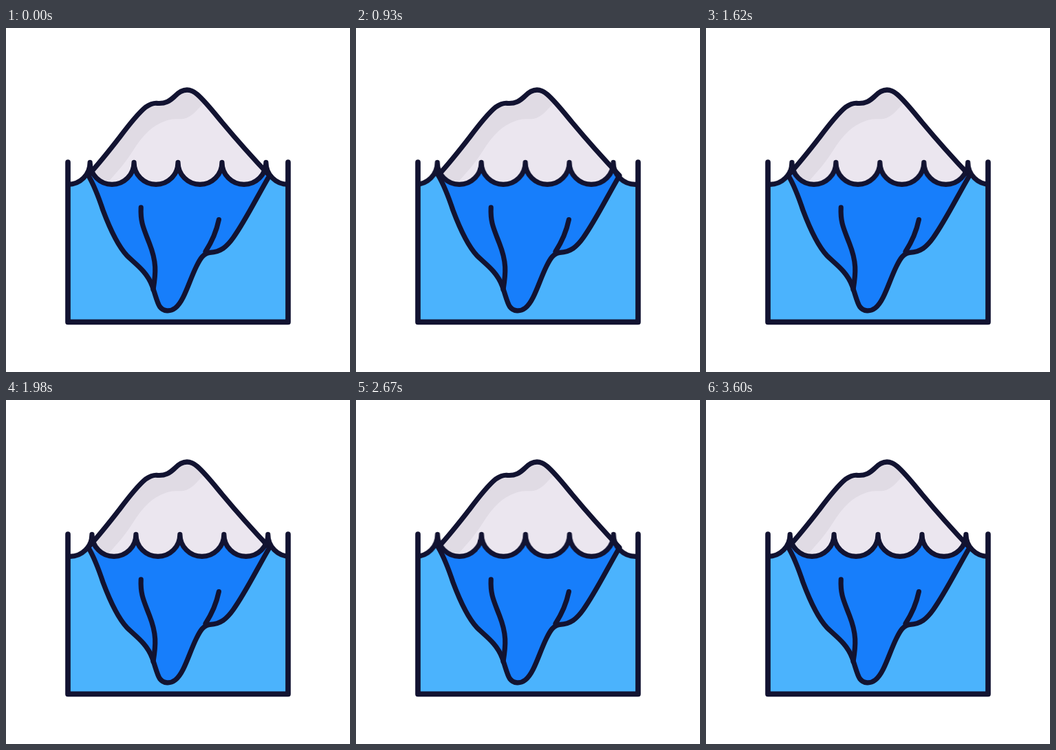
These frames come from a looping animation (500x500 px, 5.63 s). An HTML page:

```html
<!DOCTYPE html>
<html lang="en">
<head>
<meta charset="utf-8">
<title>Iceberg</title>
<style>
  html, body { margin: 0; width: 100%; height: 100%; overflow: hidden; background: #fff; }
  svg { display: block; width: 100%; height: 100%; }
  .line { fill: none; stroke: #121331; stroke-width: 7.2; stroke-linecap: round; stroke-linejoin: round; }
  .tank { stroke-width: 7.7; }
  .sea { animation: drift 5630ms infinite; }

  /* Almost two wave lengths to the left and back within 3600 ms, then rest */
  @keyframes drift {
    0% { transform: translateX(0); animation-timing-function: cubic-bezier(.5, 0, .5, 1); }
    31.972% { transform: translateX(-127px); animation-timing-function: cubic-bezier(.5, 0, .5, 1); }
    63.943%, 100% { transform: translateX(0); }
  }
</style>
</head>
<body>
<svg viewBox="0 0 500 500">
  <defs>
    <path id="berg" d="M119.5 214C137 195 150 178 165 159C180 139 192 124 203 115C209 111 214 109 219 109.3C232 110.5 238 106 245 99.5C256 88 267 87 278 96.5C289 106 300 120 314 137C334 161 356 186 383 214.5C364 247 348 280 330.5 304.5C321 318 312 325.5 296.5 326.3C287 327 282 336 277 346C266 368 259 397 246 407C239 412.5 229 412.5 223.5 405C219.5 399 217 387 212.5 375C205 354 187 342 176 331C161 315 150 289 141 265C135 247 129 230 119.5 214Z"/>
    <path id="wave" d="M-5.8 195.4a31.975 32 0 0 0 63.95 0a31.975 32 0 0 0 63.95 0a31.975 32 0 0 0 63.95 0a31.975 32 0 0 0 63.95 0a31.975 32 0 0 0 63.95 0a31.975 32 0 0 0 63.95 0a31.975 32 0 0 0 63.95 0a31.975 32 0 0 0 63.95 0a31.975 32 0 0 0 63.95 0V450H-5.8Z"/>
    <clipPath id="tank"><rect x="90" y="180" width="320" height="247.4"/></clipPath>
    <clipPath id="inside"><use href="#berg"/></clipPath>
  </defs>

  <use href="#berg" fill="#ebe6ef"/>
  <g clip-path="url(#tank)">
    <use class="sea" href="#wave" fill="#4bb3fd"/>
  </g>
  <g clip-path="url(#inside)">
    <use class="sea" href="#wave" fill="#177efb"/>
    <path fill="#b4afba" fill-opacity=".2" d="M131 222L100 200V80H300L288 109C278 118 270 130 258 132C249 133 243 131 232 135C213 141 199 156 186 176C175 194 162 209 150 222Z"/>
  </g>

  <g class="line">
    <use href="#berg"/>
    <path d="M196.2 260.8C195.2 283 200.4 292 208.4 313C219 340 218 355 214 380"/>
    <path d="M309.4 278.6C306.4 293 301 308 290 325"/>
    <g clip-path="url(#tank)">
      <use class="sea" href="#wave"/>
    </g>
    <path class="tank" d="M90 195.2V427.4H410V195.2"/>
  </g>
</svg>
</body>
</html>
```
